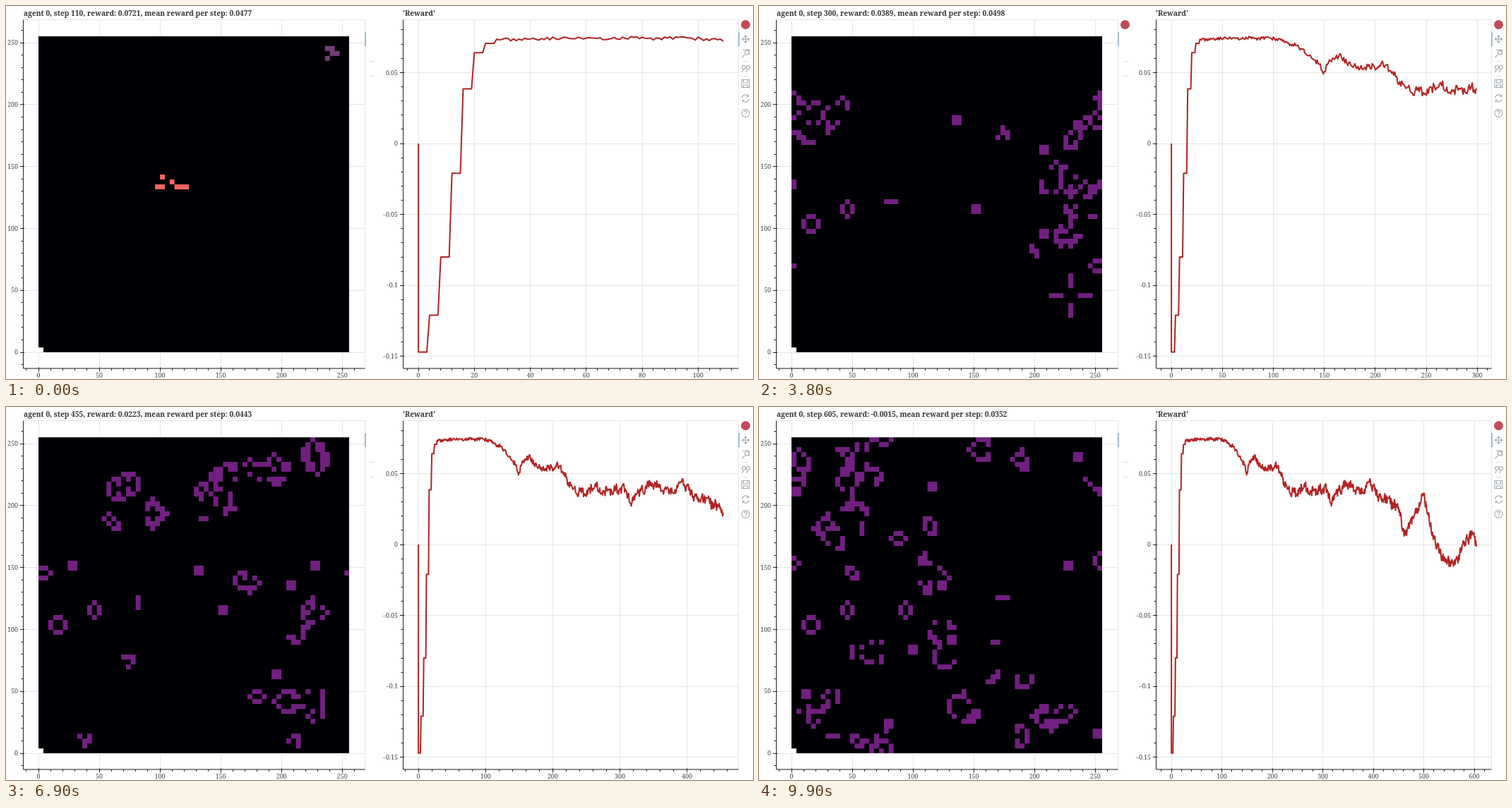
Recreate the animation shown at these times as an HTML page with a canvas. Size 1058 px wide and 529 px high, loop 10 s.

```html
<!DOCTYPE html>
<html lang="en">
<head>
<meta charset="utf-8">
<title>Agent reward</title>
<style>
html, body { margin: 0; width: 100%; height: 100%; overflow: hidden; background: #fff; }
canvas { display: block; }
</style>
</head>
<body>
<canvas id="stage" width="1058" height="529"></canvas>
<script>
const ctx = document.getElementById('stage').getContext('2d');
const N = 64, CELL = 8, FRAMES = 100, FRAME_MS = 100, FIRST = 110, STRIDE = 5;
const FONT = '"Noto Serif", serif';

// Game of Life on a torus: everything grows from one acorn and one glider
const ACORN = '.o/...o/oo..ooo', GLIDER = 'oo/.oo/o';

function stamp(b, x, y, art) {
  art.split('/').forEach((row, j) => [...row].forEach((c, i) => {
    if (c === 'o') b[(y + j) * N + x + i] = 1;
  }));
}

function evolve(b) {
  return b.map((alive, k) => {
    const x = k % N, y = k / N | 0;
    let n = -alive;
    for (let j = N - 1; j <= N + 1; j++)
      for (let i = N - 1; i <= N + 1; i++) n += b[(y + j) % N * N + (x + i) % N];
    return n === 3 || (alive && n === 2) ? 1 : 0;
  });
}

const boards = [new Uint8Array(N * N)];
stamp(boards[0], 24, 28, ACORN);
stamp(boards[0], 59, 2, GLIDER);
for (let f = 1; f < FRAMES; f++) {
  let b = boards[f - 1];
  for (let i = 0; i < STRIDE; i++) b = evolve(b);
  boards.push(b);
}

// Reward: a staircase of four steps per level, then a noisy trend between knots
const stairs = [-.147, -.121, -.08, -.021, .0385, .064, .0705];
const knots = [
  [28, .0735], [96, .0745], [109, .0721], [122, .069], [146, .056], [149, .049], [155, .059],
  [164, .0611], [188, .052], [206, .057], [234, .037], [249, .0353], [264, .043], [275, .038],
  [308, .039], [316, .029], [330, .039], [349, .042], [380, .036], [392, .044], [409, .0339],
  [450, .026], [461, .006], [494, .0298], [499, .036], [518, .006], [537, -.009], [562, -.014],
  [580, .002], [598, .008], [604, -.0015]
];
const means = [
  [110, .0477], [165, .0529], [250, .0518], [350, .0479], [410, .0464], [495, .0424], [605, .0352]
];

function lerp(points, x) {
  const i = Math.max(1, points.findIndex(p => p[0] >= x));
  const [x0, y0] = points[i - 1], [x1, y1] = points[i];
  return y0 + (y1 - y0) * (x - x0) / (x1 - x0);
}

function random(s) {
  const v = Math.sin(s * 127.1 + 3.7) * 43758.5453;
  return (v - Math.floor(v)) * 2 - 1;
}

// Noise grows with time and vanishes on the knots
function reward(s) {
  if (s < 28) return stairs[s >> 2];
  if (knots.some(p => p[0] === s)) return lerp(knots, s);
  const size = .0015 + .0035 * Math.min(1, Math.max(0, (s - 100) / 150));
  return lerp(knots, s) + size * (.7 * random(s) + .3 * random(s >> 2));
}
const rewards = Array.from({ length: FIRST + STRIDE * (FRAMES - 1) }, (_, s) => reward(s));

function line(x0, y0, x1, y1, color, w = 1) {
  ctx.strokeStyle = color;
  ctx.lineWidth = w;
  ctx.beginPath();
  ctx.moveTo(x0, y0);
  ctx.lineTo(x1, y1);
  ctx.stroke();
}

function text(s, x, y, align, font, color) {
  ctx.font = font + ' ' + FONT;
  ctx.fillStyle = color;
  ctx.textAlign = align;
  ctx.fillText(s, x, y);
}

const snap = v => Math.floor(v) + .5;
const label = v => String(+v.toFixed(2)).replace('-', '\u2212');

// Calls fn(value, isMajor) for each tick inside [lo, hi]
function ticks(lo, hi, major, fn) {
  const minor = major / 5;
  for (let k = Math.ceil(lo / minor); k * minor <= hi; k++) fn(k * minor, k % 5 === 0);
}

function plot([l, t, r, b], xr, xStep, yr, yStep) {
  const px = v => l + (v - xr[0]) / (xr[1] - xr[0]) * (r - l);
  const py = v => b - (v - yr[0]) / (yr[1] - yr[0]) * (b - t);
  const grid = '#e5e5e5', ink = '#222', small = '8.9px';
  ctx.strokeStyle = grid;
  ctx.lineWidth = 1;
  ctx.strokeRect(l, t, r - l, b - t);
  ticks(...xr, xStep, (v, major) => {
    const x = snap(px(v));
    if (major) {
      line(x, t, x, b, grid);
      text(label(v), px(v), 527, 'center', small, '#444');
    }
    line(x, b - (major ? 1.5 : 0), x, b + (major ? 4.5 : 3), ink);
  });
  ticks(...yr, yStep, (v, major) => {
    const y = snap(py(v));
    if (major) {
      line(l, y, r, y, grid);
      text(label(v), l - 7.5, py(v) + 3.2, 'right', small, '#444');
    }
    line(l - (major ? 4.5 : 3), y, l + (major ? 1.5 : 0), y, ink);
  });
  line(l, t, l, b, ink);
  line(l, b, r, b, ink);
  return [px, py];
}

// The spacing that comes closest to six ticks
function niceStep(range) {
  const err = s => Math.abs(6 - range / s);
  return [10, 20, 50, 100, 200].reduce((a, s) => err(s) < err(a) ? s : a);
}

const sheet = document.createElement('canvas');
sheet.width = sheet.height = N * CELL;
const pen = sheet.getContext('2d');

function drawBoard(f) {
  const cell = (c, r, color) => {
    pen.fillStyle = color;
    pen.fillRect(c * CELL, r * CELL, CELL, CELL);
  };
  pen.fillStyle = '#000004';
  pen.fillRect(0, 0, N * CELL, N * CELL);
  boards[f].forEach((alive, k) => {
    const c = k % N, r = k / N | 0;
    if (alive) cell(c, r, f ? '#721f81' : r > 20 ? '#ee665f' : '#733d7a');
  });
  cell(0, N - 1, '#fff');
  ctx.drawImage(sheet, 46.1, 42.7, 440.1, 448.6);
}

function drawCurve(n, px, py) {
  ctx.beginPath();
  ctx.moveTo(px(0), py(0));
  for (let s = 0; s <= n; s++) ctx.lineTo(px(s), py(rewards[s]));
  ctx.strokeStyle = '#b22222';
  ctx.lineWidth = 2;
  ctx.lineJoin = 'round';
  ctx.stroke();
}

const icons = [
  [47, 'M-5 0H5M0-5V5M-3-2L-5 0L-3 2M3-2L5 0L3 2M-2-3L0-5L2-3M-2 3L0 5L2 3'],
  [67, 'M-4-5H5V2M-1 2L-5 6M5-1A3 3 0 1 1-1-1A3 3 0 1 1 5-1'],
  [89, 'M0-2A2.5 2.5 0 1 1-5-2A2.5 2.5 0 1 1 0-2M6-2A2.5 2.5 0 1 1 1-2A2.5 2.5 0 1 1 6-2M-3 1L-5 5M3 1L1 5'],
  [110, 'M-5.5-5.5H5.5V5.5H-5.5ZM-3-5V-1H3V-5M-3 5V2H3V5'],
  [131, 'M-5-1A5 5 0 0 1 4-3M5 1A5 5 0 0 1-4 3M4-5V-2.5H1.5M-4 5V2.5H-1.5'],
  [152, 'M5.5 0A5.5 5.5 0 1 1-5.5 0A5.5 5.5 0 1 1 5.5 0M-2-1.5A2 2 0 1 1 .8 .2L0 1.5M0 2.7V3.8']
].map(([y, d]) => [y, new Path2D(d)]);

function badge(x) {
  ctx.fillStyle = '#c14a57';
  ctx.beginPath();
  ctx.arc(x, 26.5, 6.5, 0, 7);
  ctx.fill();
}

function drawTools(f) {
  for (const x of [509, 1038]) line(x, 37, x, 57, '#83aabd', 1.5);
  for (const x of [519, 1048])
    for (const y of [78.5, 99.5]) line(x - 3.5, y, x + 3.5, y, '#ddd');
  if (f >= 38 && f < 68) badge(518.5);
  badge(1047.5);
  ctx.strokeStyle = '#a1a9ad';
  ctx.lineWidth = 1.1;
  for (const [y, path] of icons) {
    ctx.save();
    ctx.translate(1047.5, y);
    ctx.stroke(path);
    ctx.restore();
  }
}

function draw(f) {
  const step = FIRST + STRIDE * f, n = step - 1;
  const now = rewards[n].toFixed(4), mean = lerp(means, step).toFixed(4);
  const head = 'bold 10.25px';
  ctx.fillStyle = '#fff';
  ctx.fillRect(0, 0, 1058, 529);
  plot([24.5, 19.5, 508.5, 514], [-12.5, 268.8], 50, [-13.1, 268.6], 50);
  drawBoard(f);
  const [px, py] = plot([562.5, 19.5, 1037.5, 514],
    [-.05 * n, 1.05 * n], niceStep(1.1 * n), [-.1585, .0872], .05);
  drawCurve(n, px, py);
  text(`agent 0, step ${step}, reward: ${now}, mean reward per step: ${mean}`, 25, 13.5, 'left', head, '#333');
  text("'Reward'", 562, 13.5, 'left', head, '#333');
  drawTools(f);
}

let shown = -1;
const t0 = performance.now();
function tick() {
  const f = Math.floor((performance.now() - t0) / FRAME_MS) % FRAMES;
  if (f !== shown) draw(shown = f);
  requestAnimationFrame(tick);
}
tick();
</script>
</body>
</html>
```
